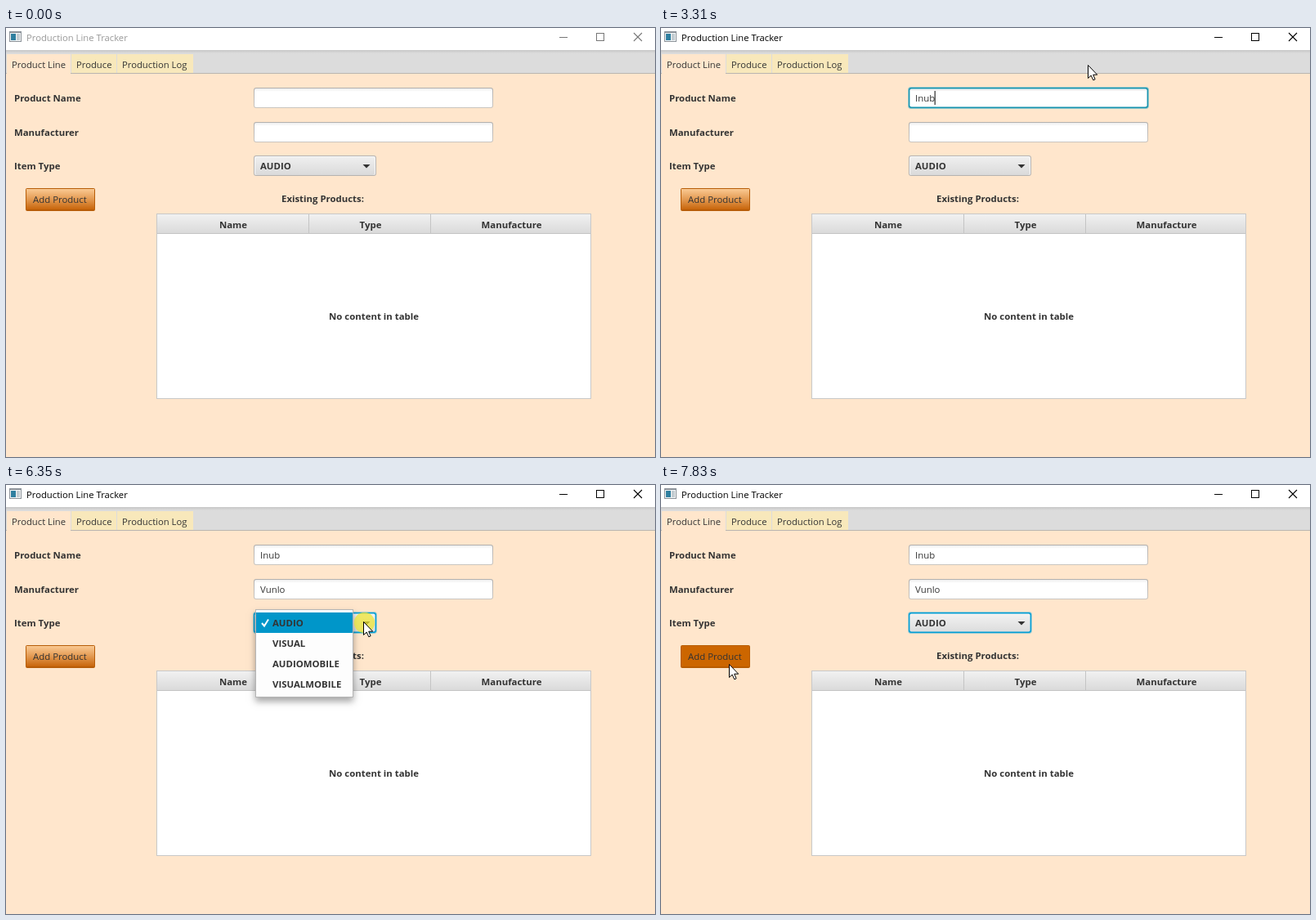
An HTML page with a canvas that plays this animation: 794x525 px, repeating every 8 s.

```html
<!DOCTYPE html>
<html lang="en">
<head>
<meta charset="utf-8">
<title>Production Line Tracker</title>
<style>
  html, body { margin: 0; width: 100%; height: 100%; overflow: hidden; background: #ffe6cc; }
  canvas { display: block; }
</style>
</head>
<body>
<canvas id="stage" width="794" height="525"></canvas>
<script>
const ctx = document.getElementById('stage').getContext('2d');
const LOOP = 8000;
const FAMILY = '"Open Sans", "Noto Sans", sans-serif';
const REGULAR = '11.4px ' + FAMILY;
const BOLD = 'bold 11.4px ' + FAMILY;
const SMALL = '11.28px ' + FAMILY;
const INK = '#333';

const ACTIVATE = 1140, TAB_KEY = 3620, COMBO_CLICK = 6280;
const POPUP = [[6350, 7200]];
const CLICKS = [[1140, 1310], [6280, 6420], [7130, 7200]];
const HOVER = 7830;

const fields = [
  { y: 73, word: 'Inub', keys: [2700, 3000, 3150, 3310],
    focus: [[ACTIVATE, TAB_KEY]], caret: [[1310, 1740], [2290, TAB_KEY]] },
  { y: 115, word: 'Vunlo', keys: [4170, 4480, 4640, 4790, 4870],
    focus: [[TAB_KEY, COMBO_CLICK]],
    caret: [[TAB_KEY, 4090], [4170, 5420], [5960, COMBO_CLICK]] }
];

// Pointer stops: time, x, y
const pointer = [
  [280, 535, 481], [360, 500, 428], [440, 445, 346], [515, 382, 256],
  [595, 332, 186], [675, 312, 148], [750, 368, 99], [980, 377, 89],
  [1310, 412, 82], [1420, 460, 62], [1520, 500, 48], [1600, 522, 45],
  [5730, 529, 52], [5810, 518, 102], [5880, 488, 128], [5960, 463, 151],
  [6040, 445, 163], [6120, 437, 167],
  [7590, 395, 176], [7670, 285, 196], [7750, 165, 213], [7830, 83, 219]
];

const within = (t, spans) => spans.some(([a, b]) => t >= a && t < b);

function rect(x, y, w, h, fill) {
  ctx.fillStyle = fill;
  ctx.fillRect(x, y, w, h);
}

function rounded(x, y, w, h, r, fill) {
  ctx.fillStyle = fill;
  ctx.beginPath();
  ctx.roundRect(x, y, w, h, r);
  ctx.fill();
}

function shade(y0, y1, ...colors) {
  const g = ctx.createLinearGradient(0, y0, 0, y1);
  colors.forEach((c, i) => g.addColorStop(i / (colors.length - 1), c));
  return g;
}

function text(str, x, y, font = BOLD, color = INK, align = 'left') {
  ctx.font = font;
  ctx.fillStyle = color;
  ctx.textAlign = align;
  ctx.fillText(str, x, y);
}

function line(points, color, width) {
  ctx.strokeStyle = color;
  ctx.lineWidth = width;
  ctx.beginPath();
  points.forEach(([x, y]) => ctx.lineTo(x, y));
  ctx.stroke();
}

function drawTitleBar(active) {
  const ink = active ? '#000' : '#999';
  const mark = active ? '#000' : '#777';
  rect(0, 0, 794, 27, '#fff');
  rect(4, 4, 15, 13, '#8b9299');
  rect(5, 6, 13, 10, '#f4f6f7');
  rect(6, 7, 6, 8, '#2f7f9f');
  rect(13, 7, 4, 8, '#c3ccd1');
  text('Production Line Tracker', 25, 16, SMALL, ink);
  rect(677, 11, 10, 1, mark);
  ctx.strokeStyle = mark;
  ctx.lineWidth = 1;
  ctx.strokeRect(722.5, 6.5, 9, 9);
  line([[768, 6], [778, 16]], mark, 1.1);
  line([[778, 6], [768, 16]], mark, 1.1);
}

function drawTabs() {
  rect(0, 27, 794, 28, '#dcdcdc');
  rect(0, 27, 794, 4, shade(27, 31, '#c6c6c6', '#dcdcdc'));
  rect(0, 55, 794, 1, '#b9b5b0');
  rect(1, 32, 78, 24, '#ffe6cc');
  rect(80, 32, 55, 23, '#f8e8bb');
  rect(136, 32, 93, 23, '#f8e8bb');
  text('Product Line', 7, 49, SMALL);
  text('Produce', 86, 49, SMALL);
  text('Production Log', 142, 49, SMALL);
}

function drawField(t, f) {
  const { y } = f;
  if (within(t, f.focus)) {
    rounded(302, y - 1, 295, 27, 4, '#8fc6cc');
    rounded(303, y, 293, 25, 3, '#1893ad');
    rounded(304.4, y + 1.4, 290.2, 22.2, 2, '#fff');
    rect(305, y + 2, 289, 2, 'rgba(0,0,0,.05)');
  } else {
    rounded(303, y, 293, 25, 3, shade(y, y + 25, '#b2b0ae', '#c9c5c0'));
    rounded(304, y + 1, 291, 23, 2, shade(y + 1, y + 5, '#ededed', '#fff'));
  }
  const typed = f.word.slice(0, f.keys.filter(k => k <= t).length);
  text(typed, 311, y + 17, REGULAR);
  if (within(t, f.caret)) {
    rect(310.5 + ctx.measureText(typed).width, y + 4, 1, 17, '#000');
  }
}

function drawCombo(focused) {
  if (focused) {
    rounded(302, 155, 152, 27, 4, '#9fcbd2');
    rounded(303, 156, 150, 25, 3, '#039ed3');
    rounded(304.4, 157.4, 147.2, 22.2, 2, shade(157, 180, '#f3f3f3', '#dcdcdc'));
  } else {
    rounded(303, 156, 150, 25, 3, '#b5b3b1');
    rounded(304, 157, 148, 23, 2, '#f8f8f8');
    rounded(305, 158, 146, 22, 2, shade(158, 180, '#efefef', '#dadada'));
  }
  text('AUDIO', 311, 173);
  ctx.fillStyle = INK;
  ctx.beginPath();
  ctx.moveTo(436.5, 167);
  ctx.lineTo(445.5, 167);
  ctx.lineTo(441, 171.5);
  ctx.fill();
}

function drawButton(hover) {
  rounded(24, 196, 85, 28, 2, hover ? '#b85c00' : '#b75d08');
  rect(25, 197, 83, 25, hover ? '#cc6600' : shade(197, 222, '#fac992', '#e39a52', '#c8660c'));
  text('Add Product', 33, 214, REGULAR);
}

function drawTable() {
  text('Existing Products:', 337, 213);
  rect(184, 227, 532, 227, '#c8c8c8');
  rect(185, 228, 530, 225, '#fff');
  rect(185, 228, 530, 23, shade(228, 251, '#f1f1f1', '#dadada'));
  rect(185, 251, 530, 1, '#c4c4c4');
  rect(370, 228, 1, 23, '#c4c4c4');
  rect(519, 228, 1, 23, '#c4c4c4');
  text('Name', 278, 245, BOLD, INK, 'center');
  text('Type', 446, 245, BOLD, INK, 'center');
  text('Manufacture', 618.5, 245, BOLD, INK, 'center');
  text('No content in table', 450, 357, BOLD, INK, 'center');
}

function drawPopup() {
  ctx.save();
  ctx.shadowColor = 'rgba(0,0,0,.35)';
  ctx.shadowBlur = 8;
  ctx.shadowOffsetY = 5;
  rect(305, 152, 120, 108, '#b5b5b5');
  ctx.restore();
  rect(306, 153, 118, 106, '#fdfdfd');
  rect(306, 156, 118, 25, '#0096c9');
  line([[313, 169], [316, 172.5], [321, 164.5]], '#fff', 2);
  ['AUDIO', 'VISUAL', 'AUDIOMOBILE', 'VISUALMOBILE']
    .forEach((item, i) => text(item, 326, 173 + 25 * i));
}

function drawPointer(t) {
  const stop = pointer.filter(p => p[0] <= t).pop();
  if (!stop) return;
  const [, x, y] = stop;
  if (within(t, CLICKS)) {
    ctx.fillStyle = 'rgba(238,228,50,.74)';
    ctx.beginPath();
    ctx.arc(x + 1.5, y + 1.5, 12.7, 0, 7);
    ctx.fill();
  }
  const overField = x >= 303 && x < 596 && fields.some(f => y >= f.y && y < f.y + 25);
  if (overField) {
    rect(x, y - 8, 1, 17, '#000');
    [-8, 8].forEach(d => {
      rect(x - 3, y + d, 3, 1, '#000');
      rect(x + 1, y + d, 3, 1, '#000');
    });
    return;
  }
  ctx.beginPath();
  [[0, 0], [0, 16], [3.7, 12.6], [6.3, 18.3], [8.6, 17.3], [6.2, 11.7], [11.2, 11.7]]
    .forEach(([dx, dy]) => ctx.lineTo(x + dx + .5, y + dy + .5));
  ctx.closePath();
  ctx.fillStyle = '#fff';
  ctx.fill();
  ctx.strokeStyle = '#000';
  ctx.lineWidth = 1;
  ctx.stroke();
}

function draw(t) {
  rect(0, 0, 794, 525, '#ffe6cc');
  drawTitleBar(t >= ACTIVATE);
  drawTabs();
  text('Product Name', 10, 90);
  text('Manufacturer', 10, 132);
  text('Item Type', 10, 173);
  fields.forEach(f => drawField(t, f));
  drawCombo(t >= COMBO_CLICK);
  drawButton(t >= HOVER);
  drawTable();
  if (within(t, POPUP)) drawPopup();
  drawPointer(t);
}

const start = performance.now();
function tick() {
  draw((performance.now() - start) % LOOP);
  requestAnimationFrame(tick);
}
tick();
</script>
</body>
</html>
```
